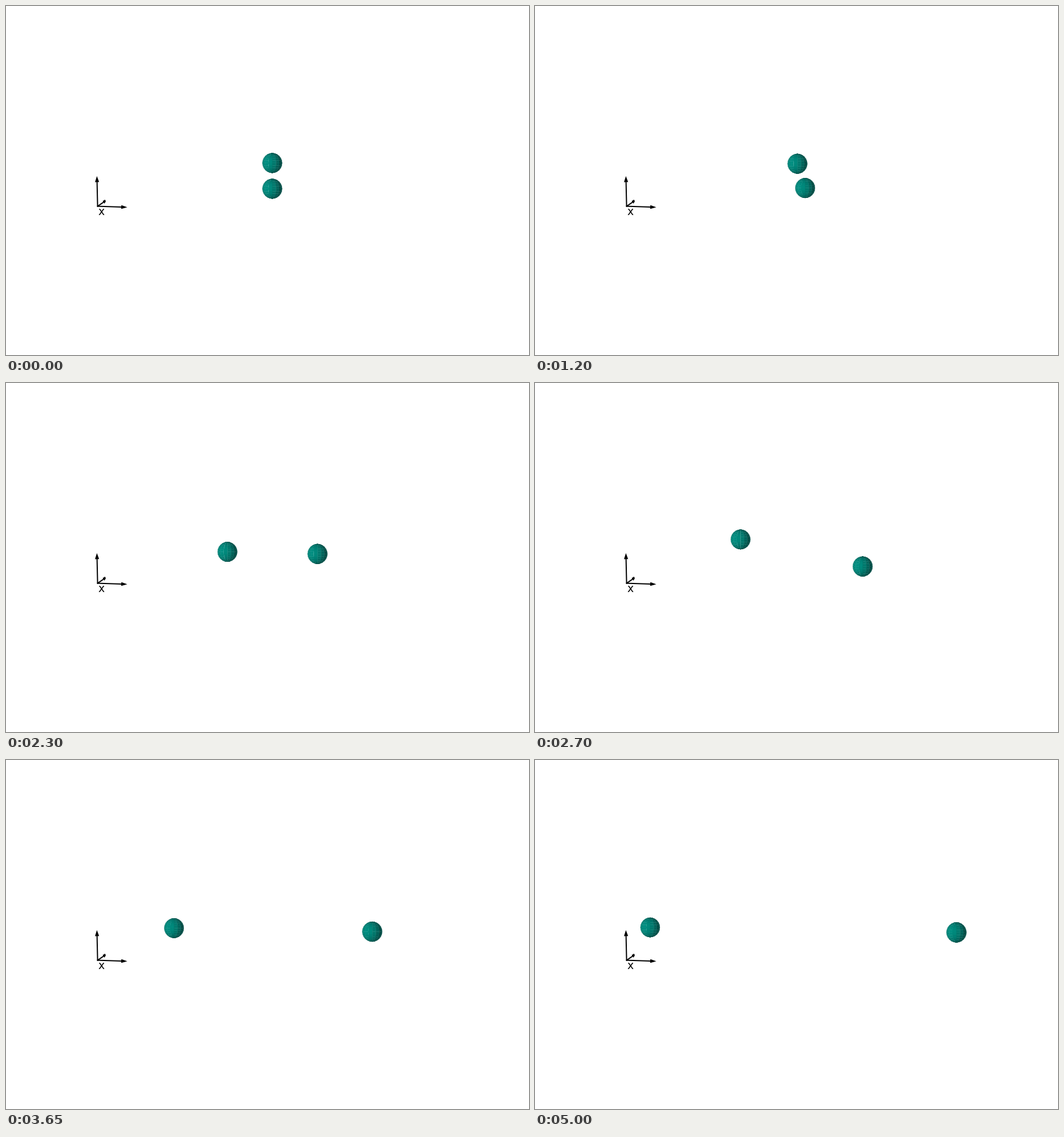
A matplotlib script for the animation above (5.05 s loop, 917 px wide and 611 px high).

```python
import numpy as np
import matplotlib.pyplot as plt
from matplotlib.animation import FuncAnimation
from matplotlib.collections import PolyCollection

W, H, DPI = 917, 611, 64
PT = 72 / DPI                      # points per pixel
FRAMES, STEP = 101, 50

CX, CY = 466.9, 297.4              # centre of the pair
RADIUS = 17.3
TILT = 0.029                       # downward slope of the x axis on screen
DEPTH = 4.9e-5                     # perspective growth along the x axis
TEAL = np.array([0, 150, 136]) / 255
LIGHT = np.array([-0.57, 0.12, 0.81])


def sphere_mesh(lons=16, lats=12):
    """Front-facing quads of a unit sphere and their flat colours."""
    def point(lat, lon):
        return np.array([np.cos(lat) * np.sin(lon), np.sin(lat),
                         np.cos(lat) * np.cos(lon)])

    lat = np.linspace(-np.pi / 2, np.pi / 2, lats + 1)
    lon = np.linspace(-np.pi / 2, np.pi / 2, lons // 2 + 1)
    quads, colors = [], []
    for a, b in zip(lat[:-1], lat[1:]):
        for c, d in zip(lon[:-1], lon[1:]):
            corners = [point(a, c), point(a, d), point(b, d), point(b, c)]
            normal = point((a + b) / 2, (c + d) / 2)
            shade = 0.5 + 0.45 * max(normal @ LIGHT, 0)
            quads.append([(p[0], -p[1]) for p in corners])
            colors.append(TEAL * shade)
    return np.array(quads), np.array(colors)


def half_gap(n):
    """Half the distance along x: rest, then a soft start to constant speed."""
    speed, start, soft = 3.51, 23.5, 2.4
    return speed * soft * np.logaddexp(0, (n - start) / soft)


def spin(n):
    """Offset of the left ball across the x axis: (up, towards viewer)."""
    turns = np.interp(n, [0, 25, 46.1, 100.7], [0, 1, 1.75, 3.75])
    r = np.interp(n, [10, 25, 39], [22.5, 21.7, 21.2])
    return r * np.cos(2 * np.pi * turns), r * np.sin(2 * np.pi * turns)


def place(x, up):
    """Screen centre and size factor of a ball."""
    k = 1 + DEPTH * x
    return np.array([CX + x * k, CY + (TILT * x - up) * k]), k


fig = plt.figure(figsize=(W / DPI, H / DPI), dpi=DPI, facecolor="white")
ax = fig.add_axes([0, 0, 1, 1])
ax.set_xlim(0, W)
ax.set_ylim(H, 0)
ax.axis("off")


def arrow(tail, tip, length, half):
    tail, tip = np.array(tail), np.array(tip)
    u = (tip - tail) / np.hypot(*(tip - tail))
    side = np.array([-u[1], u[0]]) * half
    base = tip - u * length
    ax.plot(*zip(tail, base), color="black", lw=2 * PT,
            solid_capstyle="round", zorder=1)
    ax.fill(*zip(tip, base + side, base - side), color="black", lw=0, zorder=1)


ORIGIN = (160.6, 350.6)
arrow(ORIGIN, (159.4, 297.8), 10.5, 3.6)
arrow(ORIGIN, (212.6, 352.3), 10.5, 3.3)
ax.plot([ORIGIN[0], 172], [ORIGIN[1], 342.8], color="black", lw=2 * PT, zorder=1)
ax.fill([169.5, 173.6, 175, 172.8], [341.6, 339, 341.8, 346],
        color="black", lw=0, zorder=1)
ax.text(167.2, 366.5, "x", family="DejaVu Sans", size=19 * PT,
        ha="center", va="baseline", color="black")

QUADS, COLORS = sphere_mesh()
balls = []
for _ in range(2):
    ball = PolyCollection(QUADS, facecolors=COLORS, edgecolors=COLORS,
                          linewidths=0.3 * PT, zorder=2)
    ax.add_collection(ball, autolim=False)
    balls.append(ball)


def update(n):
    gap = half_gap(n)
    up, near = spin(n)
    for ball, sign in zip(balls, (-1, 1)):
        centre, k = place(sign * gap, -sign * up)
        ball.set_verts(QUADS * RADIUS * k + centre)
        ball.set_zorder(3 if -sign * near > 0 else 2)
    return balls


anim = FuncAnimation(fig, update, frames=FRAMES, interval=STEP,
                     init_func=lambda: update(0), repeat=True, repeat_delay=0)
plt.show()
```
